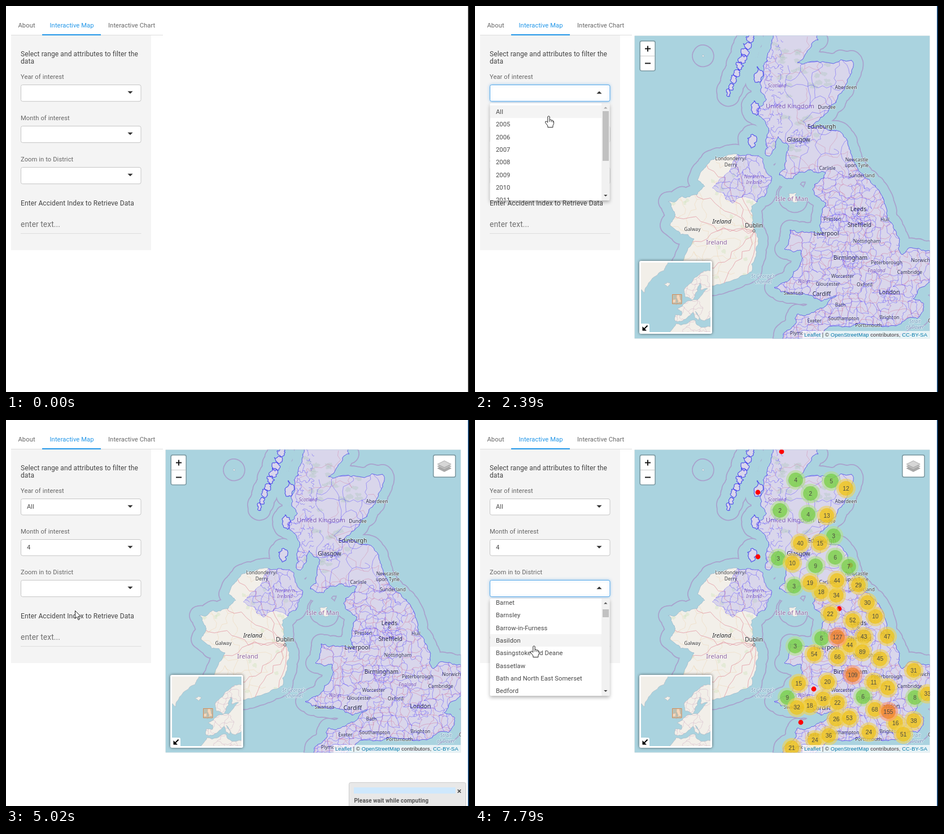
Write an HTML page with a canvas that moves like this. It is 820 by 683 pixels and loops after 8 s.

```html
<!DOCTYPE html>
<html lang="en">
<head>
<meta charset="utf-8">
<title>Interactive Map</title>
<style>
html, body { margin: 0; width: 100%; height: 100%; overflow: hidden; background: #fff; }
canvas { display: block; }
</style>
</head>
<body>
<canvas id="stage" width="820" height="683"></canvas>
<script>
const W = 820, H = 683, LOOP = 8000, ROW = 22.33;
const MAP = [282.5, 52.5, 523, 536];
const SEA = '#aad3df', LAND = '#f2efe9';
const stage = document.getElementById('stage').getContext('2d');
let c = stage, seed = 7;

const rnd = () => {
  seed = (seed + 0x6D2B79F5) | 0;
  let r = Math.imul(seed ^ seed >>> 15, 1 | seed);
  r = r + Math.imul(r ^ r >>> 7, 61 | r) ^ r;
  return ((r ^ r >>> 14) >>> 0) / 4294967296;
};
const clamp = v => Math.max(0, Math.min(1, v));
const smooth = v => { v = clamp(v); return v * v * (3 - 2 * v); };
const mix = (a, b, k) => a + (b - a) * k;
const between = (t, a, b) => t >= a && t < b;
const parse = s => s.split(' ').map(q => q.split(',').map(Number));

// Fractal line through a few key points
function rough(p, amp = .35, close = true, depth = 4) {
  if (typeof p === 'string') p = parse(p);
  if (close) p = [...p, p[0]];
  while (depth--) {
    const q = [p[0]];
    for (let i = 1; i < p.length; i++) {
      const [x, y] = p[i - 1], [u, v] = p[i], len = Math.hypot(u - x, v - y) || 1;
      const k = amp * (rnd() - .5) * Math.min(1, 30 / len);
      q.push([(x + u) / 2 - (v - y) * k, (y + v) / 2 + (u - x) * k], p[i]);
    }
    p = q;
  }
  const path = new Path2D();
  p.forEach(([x, y], i) => i ? path.lineTo(x, y) : path.moveTo(x, y));
  if (close) path.closePath();
  return path;
}

function blob(x, y, rx, ry = rx) {
  const pts = Array.from({ length: 7 }, (_, i) => {
    const a = i / 7 * Math.PI * 2, r = .65 + rnd() * .6;
    return [x + Math.cos(a) * rx * r, y + Math.sin(a) * ry * r];
  });
  return rough(pts, .6, true, 3);
}

// Irregular net of borders or roads
function mesh(x0, y0, x1, y1, gap, keep, amp = .6) {
  const path = new Path2D(), cols = Math.ceil((x1 - x0) / gap), rows = Math.ceil((y1 - y0) / gap);
  const jitter = i => (i + (rnd() - .5) * .9) * gap;
  const pts = [];
  for (let j = 0; j <= rows; j++) for (let i = 0; i <= cols; i++) pts.push([x0 + jitter(i), y0 + jitter(j)]);
  const link = (a, b) => { if (b && rnd() < keep) path.addPath(rough([a, b], amp, false, 2)); };
  pts.forEach((p, k) => {
    if (k % (cols + 1) < cols) link(p, pts[k + 1]);
    link(p, pts[k + cols + 1]);
  });
  return path;
}

function line(path, color, width = 1) {
  c.strokeStyle = color; c.lineWidth = width; c.lineJoin = 'round'; c.stroke(path);
}
function fill(path, color) { c.fillStyle = color; c.fill(path); }
function rect(x, y, w, h, color) { c.fillStyle = color; c.fillRect(x, y, w, h); }
function box(x, y, w, h, r, color, border) {
  c.beginPath(); c.roundRect(x, y, w, h, r);
  c.fillStyle = color; c.fill();
  if (border) { c.strokeStyle = border; c.lineWidth = 1; c.stroke(); }
}
function dot(x, y, r, color) {
  c.beginPath(); c.arc(x, y, r, 0, 7); c.fillStyle = color; c.fill();
}
function text(s, x, y, size = 11.18, color = '#666', style = '', family = 'Roboto') {
  c.font = `${style} ${size}px ${family}, sans-serif`;
  c.fillStyle = color;
  c.fillText(s, x, y);
}
function clipped(clip, draw) { c.save(); c.clip(clip); draw(); c.restore(); }
function area(x, y, w, h) { const p = new Path2D(); p.rect(x, y, w, h); return p; }
function layer(draw) {
  const el = document.createElement('canvas');
  el.width = W; el.height = H;
  c = el.getContext('2d');
  clipped(area(...MAP), draw);
  c = stage;
  return el;
}

const west = '545,592 568,562 571,545 606,537 640,513 612,522 590,511 555,509 530,498 561,480 580,446 577,432 548,430 558,396 617,404 610,388 621,348 598,325 621,295 590,290 562,306 539,299 556,248 537,231 521,266 514,262 520,216 498,184 516,166 505,136 510,106 524,70 527,48';
const east = '606,48 608,60 571,100 592,99 667,96 670,108 643,158 612,197 592,214 638,220 660,243 682,294 716,327 738,384 752,413 757,440 767,429 815,432 815,472 776,518 795,527 783,553 745,566 692,563 636,566 600,592';
const britain = rough(west + ' ' + east);
const ireland = rough('430,268 480,264 510,270 526,304 514,336 490,354 502,420 490,470 434,493 350,480 388,412 345,388 354,372 342,346 393,334 407,319 394,308');
const ulster = rough('470,250 560,250 560,348 500,349 474,338 456,349 420,322 441,301');
const man = blob(563, 338, 8, 10);
const isles = [];
for (let i = 0; i < 9; i++) isles.push(blob(mix(488, 449, i / 8), mix(58, 154, i / 8), mix(9, 4, i / 8), 8));
for (let i = 0; i < 3; i++) isles.push(blob(mix(502, 491, i / 2), mix(123, 240, i / 2), 9, 13));
const lands = [britain, ireland, man, blob(404, 88, 2), ...isles];

// text, centre x, baseline, kind
const places = [
  ['Aberdeen', 657, 147], ['Dundee', 623, 182], ['Edinburgh', 614, 217, 1], ['Glasgow', 573, 240, 1],
  ['Carlisle', 624, 290], ['Newcastle', 676, 275], ['upon Tyne', 676, 285], ['Sunderland', 685, 303],
  ['Leeds', 679, 363, 1], ['Preston', 633, 380], ['Sheffield', 681, 391, 1], ['Hull', 726, 381],
  ['Liverpool', 622, 406, 1], ['Nottingham', 694, 419], ['Birmingham', 665, 449, 1],
  ['Peterborough', 729, 457], ['Norwich', 789, 453], ['Cambridge', 770, 474], ['Worcester', 651, 481],
  ['Gloucester', 625, 495], ['Oxford', 690, 496], ['London', 734, 510, 1], ['Swansea', 564, 511],
  ['Cardiff', 614, 513, 1], ['Bath', 647, 532], ['Exeter', 601, 560], ['Southampton', 653, 556],
  ['Brighton', 734, 554], ['Portsmouth', 697, 568], ['Plymouth', 577, 582], ['Calais', 814, 560],
  ['Dublin', 494, 392, 1], ['Galway', 385, 398], ['Londonderry/', 453, 273], ['Derry', 453, 284],
  ['Ireland', 437, 385, 2], ['United Kingdom', 558, 181, 3], ['Ireland', 428, 422, 3],
  ['Isle of Man', 561, 345, 3], ['Scotland', 535, 144, 4], ['Northern', 494, 305, 4],
  ['Ireland', 494, 315, 4], ['England', 711, 471, 4], ['Wales', 583, 490, 4],
  ["St George's", 510, 481, 5], ['Channel', 510, 491, 5], ['Strait', 779, 561, 5], ['of Dover', 779, 571, 5]
];
const kinds = [[8.5, '#333'], [10.3, '#222'], [10.6, '#222', 'italic'], [11.2, '#8d63a0'],
  [8.6, '#8d63a0', 'italic'], [8.5, '#6a94b8', 'italic']];

const tiles = layer(() => {
  rect(...MAP, SEA);
  // Sea limits run at a fixed distance from every coast
  lands.forEach(p => line(p, '#a9a2cd', 36));
  lands.forEach(p => line(p, SEA, 32.4));
  lands.forEach(p => { fill(p, LAND); line(p, '#9ab9cd', .8); });
  clipped(britain, () => {
    for (let i = 0; i < 50; i++) fill(blob(530 + rnd() * 100, 60 + rnd() * 220, 7, 4), 'rgba(190,218,178,.35)');
    line(mesh(520, 52, 670, 290, 30, .6), 'rgba(232,150,160,.6)', .8);
    line(mesh(530, 285, 806, 590, 17, .8), 'rgba(230,130,150,.6)', .8);
  });
  clipped(ireland, () => {
    for (let i = 0; i < 26; i++) fill(blob(340 + rnd() * 160, 280 + rnd() * 210, 4), 'rgba(200,222,180,.35)');
    line(mesh(330, 262, 520, 500, 26, .6), 'rgba(235,205,165,.5)', .8);
    for (let a = 1.7; a < 4.9; a += .4)
      line(rough([[495, 398], [495 + Math.cos(a) * 170, 398 + Math.sin(a) * 170]], .6, false), '#e5a3ac', .9);
  });
  c.textAlign = 'center';
  places.forEach(([s, x, y, k = 0]) => {
    const [size, color, style = ''] = kinds[k];
    c.font = `${style} ${size}px "Noto Sans", sans-serif`;
    c.strokeStyle = 'rgba(255,255,255,.6)'; c.lineWidth = 1.6; c.lineJoin = 'round';
    c.strokeText(s, x, y);
    text(s, x, y, size, color, style, '"Noto Sans"');
  });
  dot(494, 398, 2.4, '#555'); dot(494, 398, 1.4, '#fff');
  dot(679, 367, 2, '#555'); dot(679, 367, 1.1, '#fff');
});

const districts = layer(() => {
  const blue = 'rgba(70,50,255,.45)', tint = 'rgba(0,0,255,.1)';
  [britain, ...isles].forEach(p => fill(p, tint));
  clipped(britain, () => {
    line(mesh(560, 95, 680, 290, 25, .62), blue, .9);
    line(mesh(525, 292, 812, 592, 13, .7), blue, .9);
    line(mesh(495, 50, 540, 265, 8, .4, 1), blue, .9);
    for (const [x, y] of parse('735,514 645,381 664,450 683,372 575,234')) {
      const ring = new Path2D(); ring.arc(x, y, 17, 0, 7);
      clipped(ring, () => line(mesh(x - 17, y - 17, x + 17, y + 17, 6, .65), blue, .8));
    }
  });
  clipped(ireland, () => clipped(ulster, () => {
    rect(...MAP, tint);
    line(mesh(418, 262, 530, 352, 12, .7), blue, .9);
    line(ireland, blue, 2); line(ulster, blue);
  }));
  isles.forEach(p => line(p, 'rgba(50,40,245,.7)', 1.1));
  line(britain, 'rgba(70,50,255,.6)');
});

const inset = layer(() => {
  rect(290, 450, 132, 132, SEA);
  const shapes = [
    '288,448 342,448 335,468 312,485 300,508 288,500',
    '335,492 341,489 346,491 342,497',
    '424,470 400,472 390,480 370,503 372,515 386,520 394,505 398,490 400,503 412,500 394,520 374,524 358,536 366,540 366,547 355,546 354,557 364,558 386,542 396,556 398,550 390,540 406,557 424,548',
    '357,511 362,510 366,523 356,529 360,522',
    '351,519 356,518 355,525 350,525',
    '338,584 356,562 390,556 393,564 424,565 424,584'
  ].map(s => rough(s, .3, true, 3));
  shapes.forEach(p => { fill(p, LAND); line(p, '#a9b9c4', .7); });
  [2, 5].forEach(i => clipped(shapes[i], () => line(mesh(345, 470, 422, 584, 11, .75), 'rgba(190,140,175,.45)', .7)));
});

// Known clusters; the rest are scattered with even spacing
function makeClusters() {
  const all = parse('127,642,384 109,669,451 155,732,516 12,657,121 4,568,106 5,631,108 2,594,130 2,540,160 4,590,167 13,623,169 40,576,218 15,611,218 3,635,205 3,537,245 10,562,253 6,638,243 3,565,294 9,603,258 29,679,292 18,613,304 30,695,323 22,629,343 47,730,383 3,567,400 89,686,410 66,642,419 31,777,443 71,731,474 9,553,491 8,779,491 68,708,512 53,663,527 38,777,532 24,602,566 21,561,580');
  for (let i = 0; i < 600 && all.length < 60; i++) {
    const x = 530 + rnd() * 275, y = 190 + rnd() * 375;
    const free = all.every(([, u, v]) => Math.hypot(u - x, v - y) > 23);
    if (free && c.isPointInPath(britain, x, y)) all.push([Math.round(mix(2, 55, rnd())), x, y]);
  }
  return all.sort((a, b) => a[0] - b[0]);
}
const shades = n => n < 10 ? ['181,226,140', '110,204,57']
  : n < 100 ? ['241,211,87', '240,194,12'] : ['253,156,115', '241,128,23'];
const markers = layer(() => {
  parse('543,56 501,128 501,242 665,257 645,334 600,476 577,535').forEach(([x, y]) => dot(x, y, 4.4, '#f00'));
  c.textAlign = 'center';
  for (const [n, x, y] of makeClusters()) {
    const [outer, inner] = shades(n);
    dot(x, y, 17.2, `rgba(${outer},.6)`);
    dot(x, y, 12.9, `rgba(${inner},.65)`);
    text(n, x, y + 3.7, 10.32, '#4b4b40', '', '"Liberation Sans"');
  }
});

function panelBox(x, y, w, h) {
  box(x, y, w, h, 4, 'rgba(0,0,0,.25)');
  box(x + 1.7, y + 1.7, w - 3.4, h - 3.4, 2.5, '#fff');
}

function drawInset(t, alpha) {
  const late = t >= 2190, d = late ? 0 : -2, edge = late ? 3 : 1;
  c.save();
  c.shadowColor = 'rgba(0,0,0,.6)'; c.shadowBlur = late ? 5 : 0;
  box(291, 451, 129, 129, late ? 3 : 0, late ? '#fff' : '#8b9296');
  c.restore();
  clipped(area(291 + edge, 451 + edge, 129 - 2 * edge, 129 - 2 * edge), () => {
    rect(290, 450, 132, 132, '#ddd');
    c.globalAlpha = alpha; c.drawImage(inset, d, d); c.globalAlpha = 1;
    box(349.5 + d, 510.5 + d, 16.5, 16.5, 0, late ? 'rgba(255,120,0,.2)' : 'rgba(240,140,80,.4)', 'rgba(225,120,50,.75)');
  });
  if (late) box(293, 562, 16, 16, [0, 3, 0, 0], '#fff');
  c.save();
  c.translate(301, 570); c.rotate(late ? 0 : -.6);
  line(new Path2D('M4.5 -4.5L-2 2'), '#000', 2);
  fill(new Path2D('M-4.5 4.5V-3L3 4.5Z'), '#000');
  c.restore();
}

function drawMap(t) {
  const alpha = clamp((t - 1960) / 200);
  rect(...MAP, '#ddd');
  c.globalAlpha = alpha; c.drawImage(tiles, 0, 0); c.globalAlpha = 1;
  c.drawImage(districts, 0, 0);
  if (t >= 5465) c.drawImage(markers, 0, 0);

  panelBox(291.3, 61, 28.7, 54.6);
  rect(293, 88, 25.3, 1, '#ccc');
  rect(301, 74.6, 10, 1.9, '#111'); rect(305, 70.6, 1.9, 10, '#111');
  rect(301, 100.5, 10, 1.9, '#111');

  if (t >= 3390) {
    panelBox(756, 61, 41, 41);
    ['#a9a9a9', '#bdbdbd', '#d6d6d6'].forEach((color, i) => {
      c.save(); c.translate(776.3, 86.5 - i * 3.7);
      const sheet = new Path2D('M0 -7L12 -1L0 5L-12 -1Z');
      fill(sheet, color); line(sheet, '#999', .7);
      c.restore();
    });
  }
  drawInset(t, alpha);

  rect(580, 575, 225.5, 13.5, 'rgba(255,255,255,.72)');
  let x = 583;
  [['Leaflet', 1], [' | © '], ['OpenStreetMap', 1], [' contributors, '], ['CC-BY-SA', 1]].forEach(([s, link]) => {
    text(s, x, 585, 9.46, link ? '#0078a8' : '#333', '', '"Liberation Sans"');
    x += c.measureText(s).width;
  });
}

const range = (a, n) => ['All', ...Array.from({ length: n }, (_, i) => String(a + i))];
const [year, month, district] = [
  { label: 'Year of interest', y: 139, open: 840, pick: 2835, value: 'All', rows: range(2005, 12), thumb: 88 },
  { label: 'Month of interest', y: 212, open: 3695, pick: 4695, value: '4', rows: range(1, 12), thumb: 82 },
  { label: 'Zoom in to District', y: 285, open: 6155, pick: Infinity, thumb: 14, rows: ['All', 'Aberdeen City',
    'Aberdeenshire', 'Adur', 'Allerdale', 'Alnwick', 'Amber Valley', 'Angus', 'Argyll and Bute', 'Arun', 'Ashfield',
    'Ashford', 'Aylesbury Vale', 'Babergh', 'Barking and Dagenham', 'Barnet', 'Barnsley', 'Barrow-in-Furness',
    'Basildon', 'Basingstoke and Deane', 'Bassetlaw', 'Bath and North East Somerset', 'Bedford',
    'Berwick-upon-Tweed', 'Bexley'] }
];
const fields = [year, month, district];

function triangle(x, y, r, up, color) {
  const d = up ? -r / 2 : r / 2;
  c.beginPath(); c.moveTo(x - r, y - d); c.lineTo(x + r, y - d); c.lineTo(x, y + d);
  c.fillStyle = color; c.fill();
}

const caretOn = (f, t) => f === year ? t < 2000 : (t - f.open + 35) % 1060 < 530;

function drawField(f, t, shift) {
  const y = f.y - shift, open = between(t, f.open, f.pick), done = t >= f.pick;
  text(f.label, 26, y - 10);
  c.save();
  if (open) { c.shadowColor = 'rgba(102,175,233,.55)'; c.shadowBlur = 5; }
  box(26.5, y + .5, 212.5, done ? 28.5 : 29.2, 3, '#fff', open ? '#5aabea' : '#c6c6c6');
  c.restore();
  triangle(220, y + 14, 4.6, open, '#333');
  if (done) text(f.value, 37, y + 18, 11.18, '#4a4a4a');
  if (open && caretOn(f, t)) rect(37, y + 6, 1, 16, '#444');
}

function drawList(f, t, shift, tip) {
  const base = f.y - shift + 30, top = base + 3;
  const scroll = f === district ? 343 * smooth((t - 6640) / 900) : 0;
  const inside = tip[1] > base && !(f === year && t < 2000);
  const hot = inside ? Math.max(0, Math.floor((tip[1] + 2 - base - 7 + scroll) / ROW)) : 0;
  c.save();
  c.shadowColor = 'rgba(0,0,0,.3)'; c.shadowBlur = 6; c.shadowOffsetY = 3;
  box(26.5, top, 212, 172, 2, '#fff');
  c.restore();
  clipped(area(26, top, 213, 172), () => {
    f.rows.forEach((s, i) => {
      const mid = base + 18 + i * ROW - scroll;
      if (i === hot) rect(27, mid - ROW / 2, 197, ROW, '#f4f4f4');
      text(s, 37, mid + 4, 11.18, '#484848');
    });
    rect(224, top, 14, 172, '#f1f1f1');
    rect(226, base + 17 + scroll * 5 / 343, 11, f.thumb, '#c1c1c1');
    triangle(231.3, base + 11, 3.2, true, scroll ? '#505050' : '#a3a3a3');
    triangle(231.3, base + 166.5, 3.2, false, '#404040');
  });
}

function drawNotice() {
  box(607.5, 641.5, 207, 60, 3, '#e8e8e8', '#ccc');
  rect(616, 650, 180, 11, '#cfe8fc');
  line(new Path2D('M800 654L805.5 659.5M805.5 654L800 659.5'), '#444', 1.7);
  text('Please wait while computing', 616.5, 677, 10.1, '#555', 'bold');
}

// start, end, x, y of each move
const moves = [
  [0, 130, 470, 420], [130, 760, 165, 148], [1040, 1310, 165, 192], [1400, 1680, 157, 210], [1970, 2060, 150, 209],
  [2200, 2620, 105, 177], [3010, 3165, 111, 186], [3165, 3480, 135, 222], [3870, 4160, 130, 269],
  [4210, 4640, 121, 343], [4980, 5320, 126, 295], [5900, 6020, 139, 301], [6600, 6860, 140, 408], [7660, 7780, 104, 398.5]
];
function cursorAt(t) {
  let [, , x, y] = moves[0];
  for (const [a, b, u, v] of moves) {
    const k = clamp((t - a) / (b - a));
    x = mix(x, u, k); y = mix(y, v, k);
  }
  return [x, y];
}

const hand = new Path2D('M-1.7 1.3Q0 -.9 1.7 1.3V7Q4 5.8 4.8 7.6Q6.8 6.8 7.4 8.7Q9.2 8.5 9 11.5V14L7.4 17.2V20.2H-1.6V17.6L-5.8 12Q-6.6 8.8 -3.8 9.6L-1.7 11.6Z');
const knuckles = new Path2D('M1.7 7V10.5M4.8 7.8V10.8M7.4 9V11.2');
const arrow = new Path2D('M0 0V13.6L3.2 10.7L5.6 16.2L7.7 15.2L5.4 9.9H9.8Z');
function drawCursor(t, [x, y]) {
  if (t < 130) return;
  const plain = between(t, 130, 700) || between(t, 3005, 3420) || between(t, 4775, 5250);
  c.save();
  c.translate(Math.round(x) + .5, Math.round(y) + .5);
  fill(plain ? arrow : hand, '#fff');
  line(plain ? arrow : hand, '#222');
  if (!plain) line(knuckles, '#222', .9);
  c.restore();
}

function draw(t) {
  const picked = fields.filter(f => t >= f.pick).length, tip = cursorAt(t);
  const shiftOf = i => Math.min(i, picked);
  c.letterSpacing = '.086px';
  rect(0, 0, W, H, '#fff');

  rect(9, 51, 269, 1, '#ddd');
  rect(9, 52, 248, 380 - picked, '#f4f4f4');
  rect(64, 50, 104, 2, '#2196e8');
  text('About', 21.5, 38);
  text('Interactive Map', 77.5, 38, 11.18, '#2196e8');
  text('Interactive Chart', 181, 38);
  text('Select range and attributes to filter the', 26, 89, 12.04, '#444');
  text('data', 26, 102, 12.04, '#444');
  text('Enter Accident Index to Retrieve Data', 26, 353 - picked, 12.04, '#444');
  text('enter text...', 26, 391 - picked, 13.76, '#707070');
  rect(26, 402 - picked, 213.5, 1, '#ddd');

  if (t >= 1995) drawMap(t);
  fields.forEach((f, i) => drawField(f, t, shiftOf(i)));
  fields.forEach((f, i) => { if (between(t, f.open, f.pick)) drawList(f, t, shiftOf(i), tip); });
  if (between(t, 3155, 3465) || between(t, 5005, 5465)) drawNotice();

  rect(818, 0, 1, H, t < 130 ? '#777' : '#2f6fae');
  rect(819, 0, 1, H, t < 130 ? '#000' : '#04182c');
  drawCursor(t, tip);
}

const start = performance.now();
function tick() {
  draw((performance.now() - start) % LOOP);
  requestAnimationFrame(tick);
}
tick();
</script>
</body>
</html>
```
